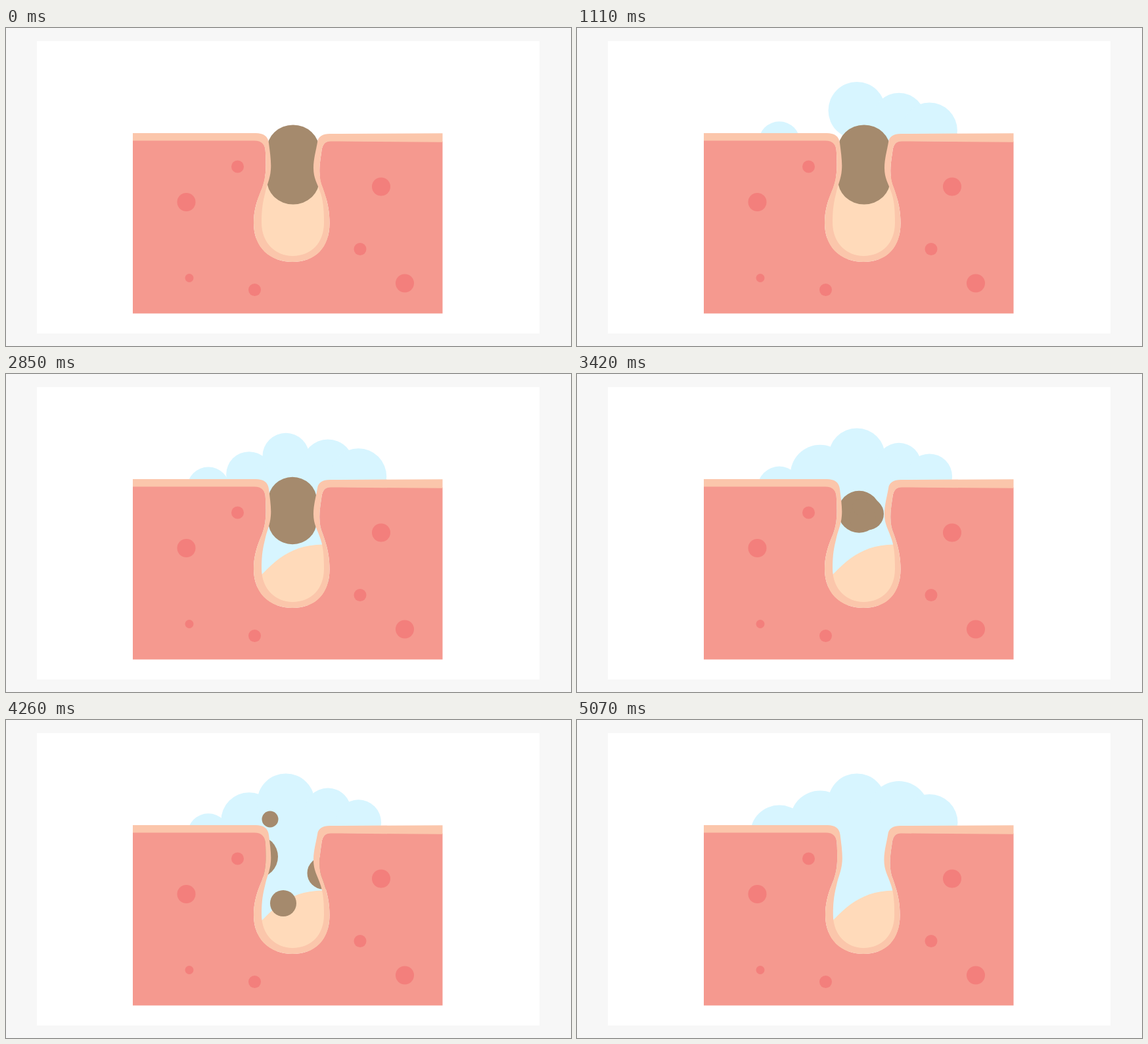
Write an HTML page that moves like this. It is 860 px wide and 484 px high and loops after 6.3 s.

```html
<!DOCTYPE html>
<html lang="en">
<head>
<meta charset="utf-8">
<title>Pore cleansing</title>
<style>
  html, body { margin: 0; width: 100%; height: 100%; overflow: hidden; background: #f7f7f7; }
  svg { display: block; width: 860px; height: 484px; }
  .foam { fill: #d7f5ff; }
  .plug { fill: #a58a6d; }
  .sebum { fill: #ffdaba; }
  .flesh { fill: #f5998f; }
  .wall { fill: #fbc6ab; }
  .spots { fill: #f37f7c; }
</style>
</head>
<body>
<svg viewBox="0 0 860 484">
  <defs>
    <clipPath id="block"><path d="M193 0H664.5V434.5H193Z"/></clipPath>
  </defs>
  <rect x="47" y="20" width="765" height="445" fill="#fff"/>
  <g id="bubbles" class="foam"></g>
  <path id="fluid" class="foam" d="M398 138H476L492 320H380Z"/>
  <path id="sebum" class="sebum"/>
  <rect id="plug" class="plug"/>
  <g id="bits" class="plug"></g>
  <g clip-path="url(#block)">
    <g id="skin">
      <path class="flesh" d="M150 170H378C389 170 395 176 395 190C396 213 396 226 390 243C383 260 377 275 377 297C377 334 402 356 436 356C471 356 492.500 334 492.500 297C492.500 275 488 260 482 243C476 229 476 214 480 190C481 178 485 172 494 172L700 173V440H150Z"/>
      <path class="wall" d="M150 160H380C392 160 399 165 400 175C402 190 404 205 403 216C402 230 397 238 394 253C390 268 389 281 389 296C389 328 411 347 436 347C464 347 484 328 484 296C484 278 483 262 478 249C474 237 468 229 468 213C468 199 472 186 474 174C475 165 482 161 493 161L700 160V174L494 172.500C485 172.500 481 178 480 190C476 214 476 229 482 243C488 260 492.500 275 492.500 297C492.500 334 471 356 436 356C402 356 377 334 377 297C377 275 383 260 390 243C396 226 396 213 395 190C395 177 389 171.500 378 171.500H150Z"/>
    </g>
  </g>
  <g class="spots">
    <circle cx="352.500" cy="211" r="9.500"/>
    <circle cx="274.500" cy="265" r="14"/>
    <circle cx="279" cy="380.500" r="6.500"/>
    <circle cx="378.500" cy="398.500" r="9.500"/>
    <circle cx="571" cy="241.500" r="14"/>
    <circle cx="539" cy="336.500" r="9.500"/>
    <circle cx="607" cy="388.500" r="14"/>
  </g>
</svg>
<script>
const LOOP = 6300, STEP = 30, BEAT = 937;
const FLOOD = 1350, BREAK_UP = 3330;
const byId = id => document.getElementById(id);
const set = (el, attrs) => Object.entries(attrs).forEach(([k, v]) => el.setAttribute(k, v));
const mix = (a, b, p) => a + (b - a) * p;
const progress = (t, from, to) => Math.min(1, Math.max(0, (t - from) / (to - from)));
const smooth = p => p * p * (3 - 2 * p);
const easeOut = p => 1 - (1 - p) ** 3;
const show = (id, on) => set(byId(id), { visibility: on ? 'visible' : 'hidden' });

function addCircle(parent) {
  const el = document.createElementNS('http://www.w3.org/2000/svg', 'circle');
  parent.append(el);
  return el;
}

// Each bubble grows from start to full, then pulses down by dip and back once per beat
const bubbles = [
  { x: 308, y: 174, size: 44.4, dip: 0.29, start: 800, full: 1710, beat: 720 },
  { x: 370, y: 153, size: 45.5, dip: 0.3, start: 1150, full: 1590, beat: BEAT },
  { x: 426, y: 125.5, size: 44, dip: 0.19, start: 0, full: 1440, beat: BEAT },
  { x: 490, y: 139, size: 46, dip: 0.28, start: 260, full: 1950, beat: 3600 },
  { x: 536.5, y: 156, size: 43, dip: 0.2, start: 580, full: 1030, beat: BEAT }
].map(b => ({ ...b, el: addCircle(byId('bubbles')) }));

// Fragments drift apart from the middle of the plug
const origin = { x: 436.5, y: 210 };
const bits = [
  { x: 382, y: 208, r: 32 },
  { x: 483, y: 233, r: 24.5 },
  { x: 422, y: 279, r: 20 },
  { x: 402, y: 151, r: 12.5 }
].map(b => ({ ...b, el: addCircle(byId('bits')) }));

function drawBubbles(t) {
  const settle = 1 - smooth(progress(t, 4300, 5040));
  for (const { el, x, y, size, dip, start, full, beat } of bubbles) {
    const pulse = (1 - Math.cos(2 * Math.PI * Math.max(0, t - full) / beat)) / 2;
    const grow = easeOut(progress(t, start, full));
    set(el, { cx: x, cy: y, r: size * grow * (1 - dip * pulse * settle) });
  }
}

function drawPlug(t) {
  const shrink = progress(t, 2670, 3240);
  const w = mix(80, 60, shrink), h = mix(121, 62, shrink);
  const cx = mix(437, 434, shrink);
  set(byId('plug'), { x: cx - w / 2, y: 208 - h / 2, width: w, height: h, rx: w / 2, ry: w * 0.47 });
  show('plug', t < BREAK_UP);
}

function drawBits(t) {
  const move = progress(t, 3300, 4230);
  const size = 1 - smooth(progress(t, 4350, 4950));
  for (const { el, x, y, r } of bits) {
    set(el, { cx: mix(origin.x, x, move), cy: mix(origin.y, y, move), r: r * size });
  }
  show('bits', t >= BREAK_UP);
}

function drawPore(t) {
  const drop = smooth(progress(t, FLOOD, 1950));
  const y = to => mix(225, to, drop);
  set(byId('sebum'), { d: `M384 ${y(310)}C400 ${y(297)} 425 ${y(258)} 486 ${y(259.5)}L492 352H380Z` });
  show('fluid', t >= FLOOD);
  const squeeze = mix(1, 0.983, smooth(progress(t, 4300, 4800)));
  set(byId('skin'), { transform: `translate(435 0) scale(${squeeze} 1) translate(-435 0)` });
}

function render(now) {
  const t = Math.floor((now % LOOP) / STEP) * STEP;
  drawBubbles(t);
  drawPore(t);
  drawPlug(t);
  drawBits(t);
}

const start = performance.now();
function tick() {
  render(performance.now() - start);
  requestAnimationFrame(tick);
}
tick();
</script>
</body>
</html>
```
